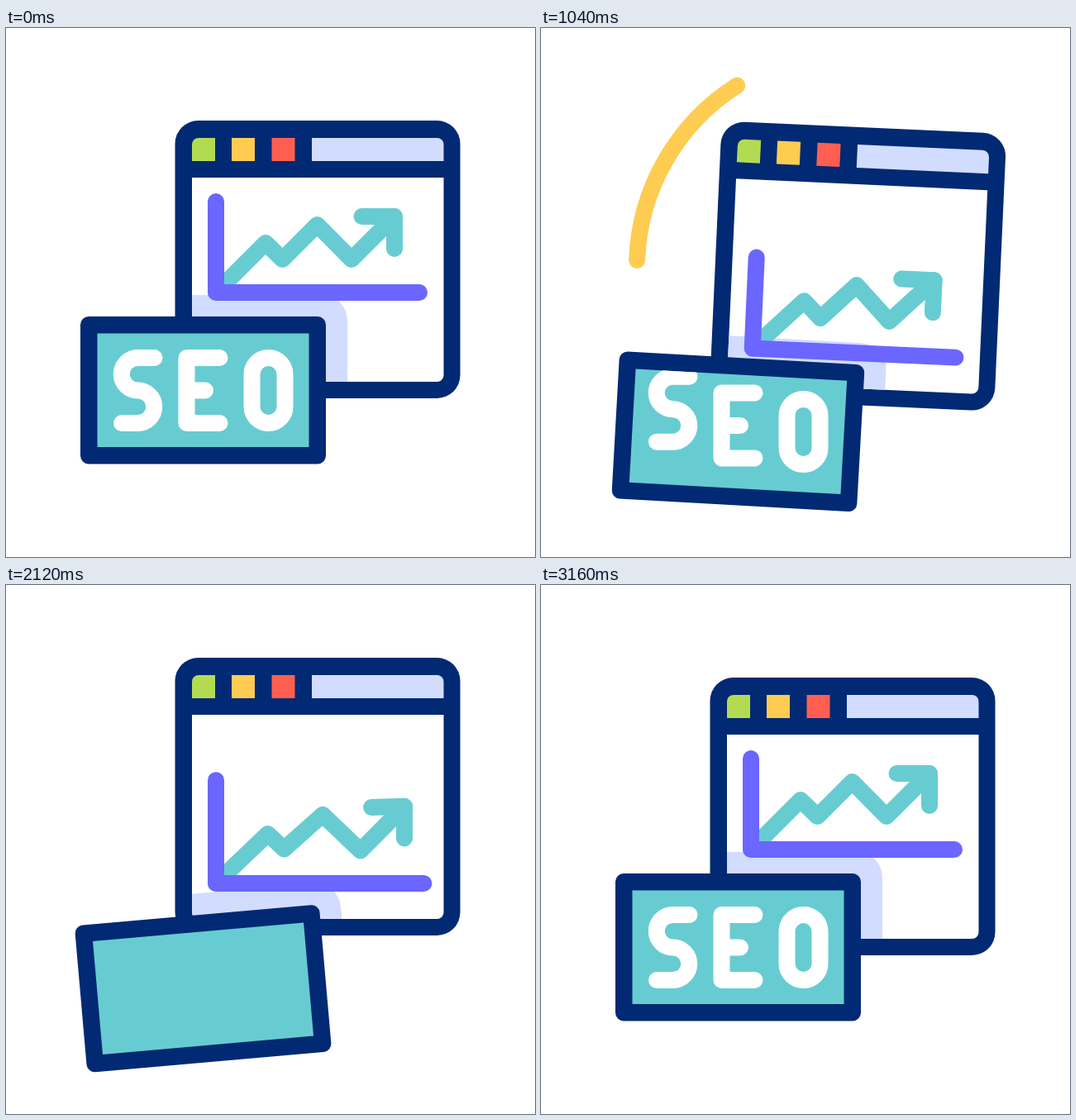
Recreate the animation shown at these times as an HTML page with a canvas. Size 640x640 px, loop 3.3 s.

```html
<!DOCTYPE html>
<html lang="en">
<head>
<meta charset="utf-8">
<title>SEO growth</title>
<style>
html, body { margin: 0; height: 100%; overflow: hidden; background: #fff; }
canvas { display: block; width: 640px; height: 640px; }
</style>
</head>
<body>
<canvas id="stage" width="640" height="640"></canvas>
<script>
const ctx = document.getElementById('stage').getContext('2d');
const LOOP = 3300;
const NAVY = '#022973', TEAL = '#67ccd1', PURPLE = '#6a66ff', PALE = '#d2dcfe';
const GREEN = '#b3db52', YELLOW = '#ffcc52', RED = '#ff5f50', WHITE = '#fff';

// Smooth keyframes [time, value] that never overshoot a key.
function track(keys) {
  const rate = i => (keys[i + 1][1] - keys[i][1]) / (keys[i + 1][0] - keys[i][0]);
  const slope = keys.map((_, i) => {
    if (!i || i === keys.length - 1) return 0;
    const a = rate(i - 1), b = rate(i);
    return a * b > 0 ? 2 * a * b / (a + b) : 0;
  });
  return t => {
    if (t <= keys[0][0]) return keys[0][1];
    const n = keys.findIndex(k => k[0] > t);
    if (n < 0) return keys[keys.length - 1][1];
    const [t0, v0] = keys[n - 1], [t1, v1] = keys[n];
    const d = t1 - t0, u = (t - t0) / d, w = 1 - u;
    return v0 * w * w * (1 + 2 * u) + v1 * u * u * (3 - 2 * u)
      + d * u * w * (slope[n - 1] * w - slope[n] * u);
  };
}

const windowY = track([[200, 0], [420, -40], [470, -45], [700, 4], [760, 8], [1040, 8], [1500, -24], [2560, -24], [2900, 0]]);
const windowTurn = track([[200, 0], [420, -1.1], [700, -2], [1020, 2.6], [1060, 2.6], [1400, 0]]);
const panelY = track([[200, 0], [440, -51], [700, -15], [1000, 50], [2560, 50], [2900, 12], [3100, 0]]);
const panelTurn = track([[200, 0], [420, -1], [700, -5], [740, -6], [1040, 3.2], [1100, 3.3], [1500, -5], [2560, -5], [2860, 0]]);
const chartDrop = track([[660, 0], [1020, 65], [2560, 65], [2960, 0]]);
const squeeze = track([[1420, 0], [1640, 1], [1700, 1.1], [2000, -0.6], [2300, 0]]);
const axisRise = track([[1420, 0], [1640, 16], [1860, 41], [2300, 0]]);
const leftHead = track([[840, 182], [1100, 246]]);
const leftTail = track([[1200, 182], [1420, 246]]);
const rightHead = track([[2890, -88], [3040, -2]]);
const rightTail = track([[2990, -88], [3150, -2]]);

const clamp = x => Math.min(1, Math.max(0, x));
const rad = deg => deg * Math.PI / 180;

function box(x, y, w, h, color, radius = 0) {
  ctx.beginPath();
  ctx.roundRect(x, y, w, h, radius);
  ctx.fillStyle = color;
  ctx.fill();
}

function stroke(shape, color) {
  ctx.strokeStyle = color;
  ctx.stroke(shape);
}

function polyline(points, color) {
  const path = new Path2D();
  points.forEach(([x, y]) => path.lineTo(x, y));
  stroke(path, color);
}

function turnAround(x, y, deg, dy) {
  ctx.translate(x, y + dy);
  ctx.rotate(rad(deg));
  ctx.translate(-x, -y);
}

function swoosh(x, y, r, tail, head) {
  if (head - tail < 0.1) return;
  const path = new Path2D();
  path.arc(x, y, r, rad(tail), rad(head));
  stroke(path, YELLOW);
}

const placeWindow = t => turnAround(377, 420, windowTurn(t), windowY(t));
const placePanel = t => turnAround(238.5, 438, panelTurn(t), panelY(t));

function drawChart(t) {
  const s = squeeze(t);
  // Each point: resting x and y, then how far the squeeze moves it.
  const at = (x, y, dx, dy) => [x + dx * s, y + dy * s];
  const tip = at(470, 228, -31, 3);
  ctx.translate(0, chartDrop(t));
  polyline([[254, 320], at(314, 260, -7, 0), at(334.5, 280, -5, 4),
    at(376.5, 238, -17, 3), at(418, 280, -28, -1), tip], TEAL);
  polyline([at(430.5, 228, -30, 0), tip, at(470, 267, -31, 4)], TEAL);
  polyline([[254, 210 - axisRise(t)], [254, 320], [500 - 14 * s, 320]], PURPLE);
}

function drawWindow(t) {
  ctx.save();
  placeWindow(t);
  box(204.5, 112, 345, 336, NAVY, 28);
  box(225, 133, 28, 28, GREEN, [8, 0, 0, 0]);
  box(273, 133, 28, 28, YELLOW);
  box(321.5, 133, 28, 28, RED);
  box(370, 133, 159.5, 28, PALE, [0, 8, 0, 0]);
  box(225, 181, 304.5, 247, WHITE, [0, 0, 8, 8]);

  ctx.save();
  ctx.clip();
  ctx.setTransform(1, 0, 0, 1, 0, 0);
  placePanel(t);
  box(90, 323, 323, 205, PALE, 31);
  ctx.restore();

  drawChart(t);
  ctx.restore();
}

const LETTERS = [
  'M179.5 399H159.5a19.75 19.75 0 0 0 0 39.5a19.75 19.75 0 0 1 0 39.5H140',
  'M258.5 399H218.5V478H258.5M218.5 438.5H241',
  'M297.5 419a20 20 0 0 1 40 0V458a20 20 0 0 1-40 0Z'
].map(d => new Path2D(d));

// Letters leave through the top and return from below, one after another.
function letterShift(t, i) {
  if (t < 1800) return -140 * clamp((t - 882 - 75 * i) / 360) ** 2;
  return 130 * (1 - clamp((t - 2250 - 81 * i) / 420)) ** 3;
}

function drawPanel(t) {
  ctx.save();
  placePanel(t);
  box(90, 349, 297, 178.5, NAVY, 10);
  box(110.5, 369.5, 256, 137.5, TEAL);
  ctx.clip();
  LETTERS.forEach((letter, i) => {
    ctx.setTransform(1, 0, 0, 1, 0, panelY(t) + letterShift(t, i));
    stroke(letter, WHITE);
  });
  ctx.restore();
}

function frame() {
  const t = performance.now() % LOOP;
  ctx.fillStyle = WHITE;
  ctx.fillRect(0, 0, 640, 640);
  ctx.lineWidth = 20;
  ctx.lineCap = ctx.lineJoin = 'round';
  swoosh(377, 290, 261, leftTail(t), leftHead(t));
  swoosh(407, 241, 200, rightTail(t), rightHead(t));
  drawWindow(t);
  drawPanel(t);
  requestAnimationFrame(frame);
}
frame();
</script>
</body>
</html>
```
